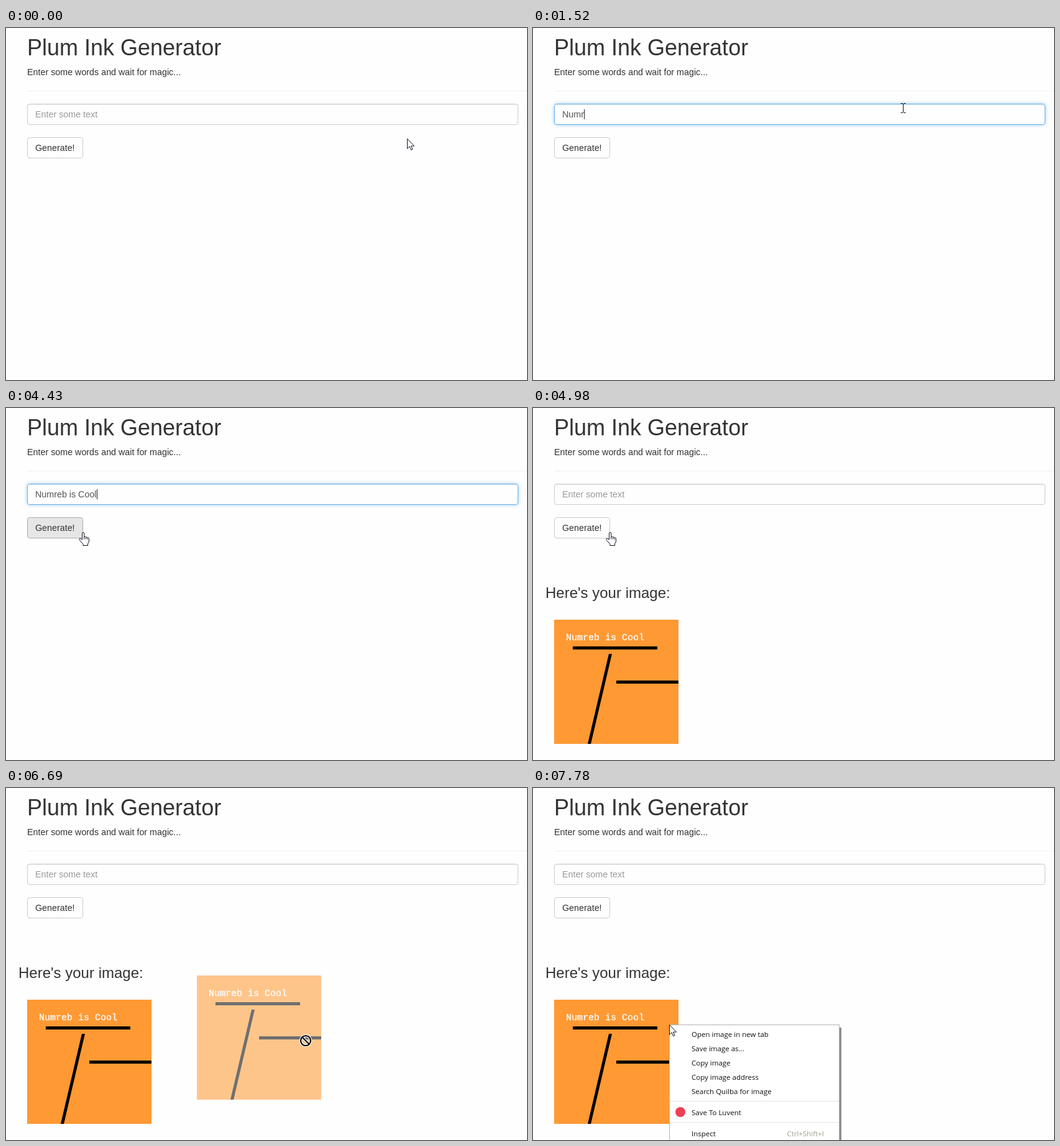
Write an HTML page that moves like this. It is 838 px wide and 567 px high and loops after 8 s.

```html
<!DOCTYPE html>
<html lang="en">
<head>
<meta charset="utf-8">
<title>Plum Ink Generator</title>
<style>
  html, body { margin: 0; width: 100%; height: 100%; overflow: hidden; background: #fefefe; }
  body { position: relative; font: 14.3px/20px "Liberation Sans", Arial, sans-serif; color: #333; }
  body > * { position: absolute; box-sizing: border-box; margin: 0; white-space: pre; }
  h1, h3 { font-weight: 400; line-height: 1.1; }
  h1 { left: 34px; top: 12.4px; font-size: 36px; }
  h3 { left: 20px; top: 284.5px; font-size: 24px; }
  p { left: 34px; top: 61px; }
  hr { left: 34px; top: 101px; width: 804px; height: 1px; border: 0; background: #eee; }
  #field, #button { left: 34px; height: 34px; padding: 6px 12px; border: 1px solid #ccc; border-radius: 4px; }
  #field { top: 122px; width: 790px; color: #555; box-shadow: inset 0 1px 1px rgba(0,0,0,.075); }
  #field.focus { border-color: #66afe9; box-shadow: inset 0 1px 1px rgba(0,0,0,.075), 0 0 6px rgba(102,175,233,.6); }
  #button { top: 176px; width: 90px; }
  #button.hover { background: #e6e6e6; border-color: #adadad; }
  #caret { display: inline-block; vertical-align: top; width: 1px; height: 16px; margin: 2px -1px 0 0; }
  .focus #caret { background: #222; }
  #hint { color: #999; }
  svg { left: 0; top: 0; }
  #menu text { font: 11.5px "Open Sans", "Noto Sans", sans-serif; fill: #111; }
  #menu .keys { fill: #a09c8c; }
</style>
</head>
<body>
<h1>Plum Ink Generator</h1>
<p>Enter some words and wait for magic...</p>
<hr>
<div id="field"><span id="typed"></span><span id="caret"></span><span id="hint">Enter some text</span></div>
<div id="button">Generate!</div>
<h3 id="heading">Here's your image:</h3>
<svg width="838" height="567">
  <defs>
    <g id="art">
      <rect width="200" height="200" fill="#f93"/>
      <path d="M30 43h136v5H30zM100 98h100v5H100zM88 55h5L59 200h-5z"/>
      <text x="19" y="33" fill="#fff" stroke="#fff" stroke-width=".3" font-family="Liberation Mono, monospace" font-size="15">Numreb is Cool</text>
    </g>
    <path id="arrow" d="M.5.5v15.8l3.6-3.4 2.5 5.7 2.4-1-2.5-5.5h5.1z" fill="#fff" stroke="#112"/>
    <path id="beam" d="M-3.5-7.5h3l1 1 1-1h3M.5-7V7M-3.5 7.5h3l1-1 1 1h3" fill="none" stroke="#111"/>
    <g id="hand" stroke="#112" stroke-linejoin="round" transform="translate(-7)">
      <path d="M5.5 12V2a1.6 1.6 0 0 1 3.2 0v6c.3-1.4 2.7-1.2 2.9.5.5-1.1 2.5-.8 2.6.8.6-.9 2.3-.5 2.3 1.2V15l-2 4v2.5H7v-2L2 13.5c-2-2.5-1-4 .8-3.2z" fill="#fff"/>
      <path d="M8.7 8v3.5M11.6 8.5v3M14.2 9.3v2.5" fill="none"/>
    </g>
    <path id="sign" d="M-8 0a8 8 0 1 0 16 0a8 8 0 1 0-16 0M-5.5-5.5l11 11" fill="none"/>
    <g id="denied">
      <use href="#sign" stroke="#fff" stroke-width="4.4"/>
      <use href="#sign" stroke="#000" stroke-width="2.2"/>
    </g>
  </defs>
  <use id="image" href="#art" x="34" y="341"/>
  <use id="ghost" href="#art" opacity=".56"/>
  <g id="menu">
    <path d="M493 386h3v181h-3z" fill="#8c8c8c"/>
    <rect x="219.5" y="381.5" width="273" height="200" fill="#fff" stroke="#b4b4b4"/>
    <path d="M220 504.5h272M220 538.5h272" stroke="#e4e4e4"/>
    <circle cx="237" cy="522" r="8" fill="#ee4056"/>
    <text class="keys" x="468" y="561" text-anchor="end">Ctrl+Shift+I</text>
  </g>
  <use id="pointer"/>
</svg>
<script>
const LOOP = 8000, STEP = 138;  // the screen refreshes once per STEP
const RELOAD = 4980, WAKE = 5680, GRAB = 6400, DROP = 6810;
const $ = id => document.getElementById(id);

// Each piece is typed in three refreshes.
const pieces = [[990, 'Nu'], [1520, 'mreb '], [2310, 'is '], [2890, 'Cool']];

// Pointer legs: start time, refreshes taken, goal.
const home = [645, 178];
const legs = [
  [150, 4, 595, 129], [3740, 5, 124, 200], [WAKE, 1, 112, 196], [5820, 4, 209, 446],
  [GRAB, 1, 224, 436], [6540, 2, 482, 407], [DROP, 1, 557, 398], [6948, 5, 219, 381]
];

const smooth = p => p * p * (3 - 2 * p);
const within = (v, from, to) => v >= from && v < to;
const progress = (t, start, steps) =>
  Math.max(0, Math.min(1, (Math.floor((t - start) / STEP) + 1) / steps));

const typedAt = t => pieces.map(([start, text]) =>
  text.slice(0, Math.round(text.length * progress(t, start, 3)))).join('');

function pointerAt(t) {
  let [x, y] = home;
  for (const [start, steps, goalX, goalY] of legs) {
    const p = smooth(progress(t, start, steps));
    x += (goalX - x) * p;
    y += (goalY - y) * p;
  }
  return [x, y].map(Math.round);
}

const show = (id, visible) => $(id).style.display = visible ? '' : 'none';
const place = (id, x, y) => { $(id).setAttribute('x', x); $(id).setAttribute('y', y); };

const menuGroups = [
  ['Open image in new tab', 'Save image as...', 'Copy image', 'Copy image address', 'Search Quilba for image'],
  ['Save To Luvent'],
  ['Inspect']
];
let baseline = 401;
for (const group of menuGroups) {
  for (const label of group) {
    const item = document.createElementNS('http://www.w3.org/2000/svg', 'text');
    item.id = label;
    item.textContent = label;
    $('menu').append(item);
    place(label, 255, baseline);
    baseline += 23;
  }
  baseline += 11;
}

function draw(t) {
  const text = t < RELOAD ? typedAt(t) : '';
  $('typed').textContent = text;
  show('hint', !text);
  $('field').className = within(t, 710, 4700) ? 'focus' : '';

  const [x, y] = pointerAt(t);
  const dragging = within(t, GRAB, DROP);
  const overField = within(x, 34, 825) && within(y, 122, 156);
  const overButton = within(x, 34, 125) && within(y, 176, 210);
  const shape = dragging ? 'denied' : overField ? 'beam' : overButton ? 'hand' : 'arrow';
  $('pointer').setAttribute('href', '#' + shape);
  place('pointer', x, y);
  $('button').className = overButton && !within(t, RELOAD, WAKE) ? 'hover' : '';

  show('heading', t >= RELOAD);
  show('image', t >= RELOAD);
  show('ghost', dragging && t >= GRAB + STEP);
  place('ghost', x - 175, y - 105);
  show('menu', t >= 7780);
}

const start = performance.now();
function tick() {
  draw((performance.now() - start) % LOOP);
  requestAnimationFrame(tick);
}
tick();
</script>
</body>
</html>
```
